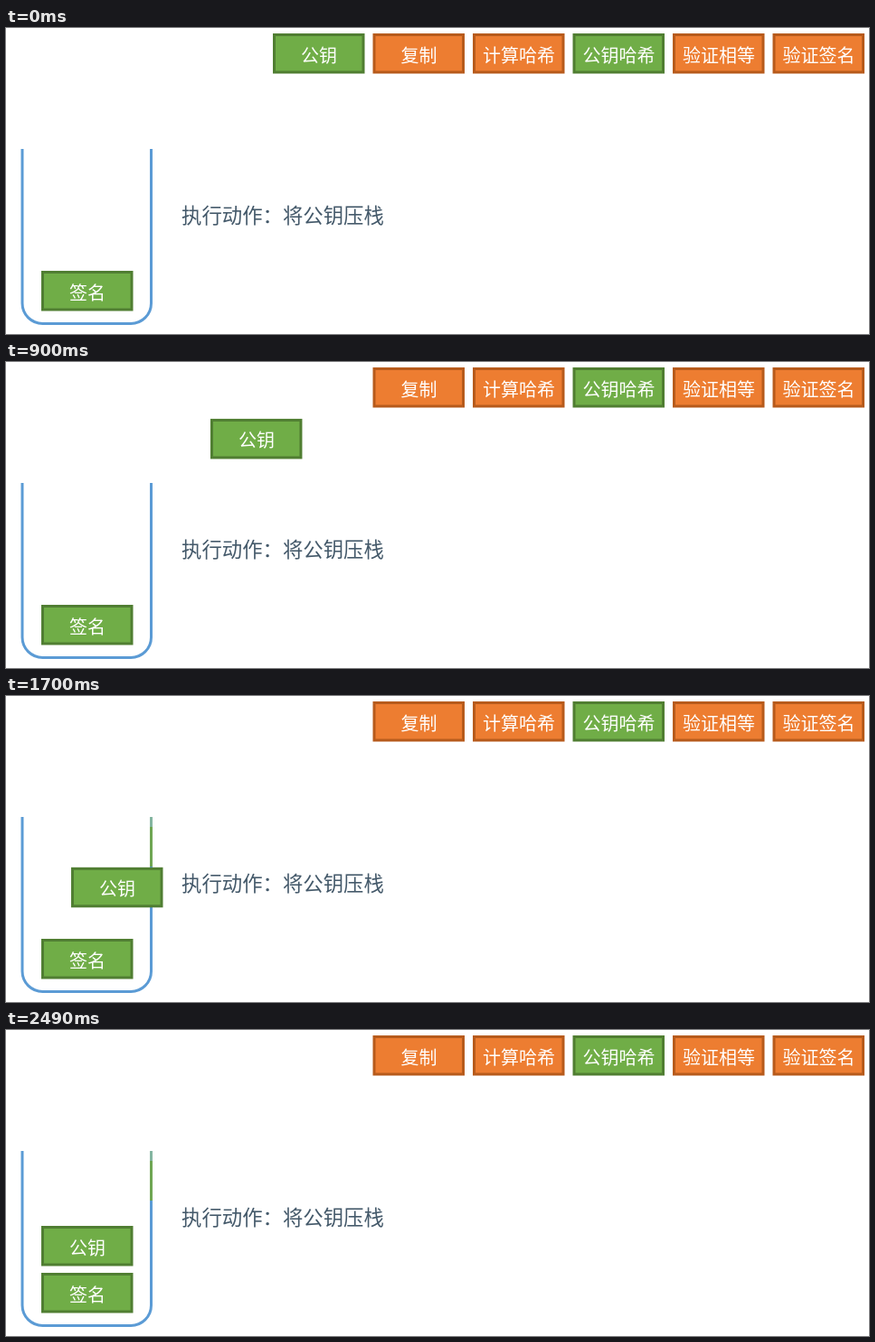
Recreate the animation shown at these times as an HTML page. Size 954x339 px, loop 5060 ms.

```html
<!DOCTYPE html>
<html lang="zh-CN">
<head>
<meta charset="utf-8">
<style>
  html, body { margin: 0; width: 100%; height: 100%; overflow: hidden; background: #fff; }
  svg { display: block; }
  text { font-family: "Noto Sans CJK SC", "Noto Sans CJK", sans-serif; font-weight: 300; dominant-baseline: central; }
  .box { stroke-width: 3; }
  .box text { font-size: 20px; fill: #fff; stroke: none; text-anchor: middle; }
  .data { fill: #70ad47; stroke: #507e32; }
  .op { fill: #ed7d31; stroke: #b75b1c; }
</style>
</head>
<body>
<svg id="stage" width="954" height="339" viewBox="0 0 954 339">
  <path d="M18 134V305a22.5 22.5 0 0 0 22.5 22.5H138a22.5 22.5 0 0 0 22.5-22.5V134" fill="none" stroke="#5b9bd5" stroke-width="3"/>
  <rect id="paleTrail" x="159" y="134" width="3" fill="#84b5a0"/>
  <rect id="greenTrail" x="159" y="145" width="3" fill="#6fa653"/>
  <text x="194" y="206" font-size="22.4" fill="#44596a">执行动作：将公钥压栈</text>
</svg>
<script>
const LOOP = 5060;
const START = { x: 295, y: 6 }, END = { x: 39, y: 217 };
const stage = document.getElementById('stage');
const paleTrail = document.getElementById('paleTrail');
const greenTrail = document.getElementById('greenTrail');

// Moments at which the moving box is redrawn
const ticks = [490, 570, 640, 720, 810, 890, 970, 1050, 1130, 1230, 1300, 1380, 1450,
  1550, 1600, 1700, 1770, 1850, 1920, 2000, 2070, 2170, 2250, 2330, 2410, 2490];

// Time and left edge along the path
const path = [[490, 292], [640, 276], [810, 246], [970, 204], [1130, 161],
  [1450, 102], [1550, 92], [1700, 72], [2070, 45], [2490, 39]];

function addBox(label, kind, x, y) {
  const g = document.createElementNS('http://www.w3.org/2000/svg', 'g');
  g.setAttribute('class', 'box ' + kind);
  g.innerHTML = `<rect x="1.5" y="1.5" width="98.5" height="41.5"/><text x="51" y="23">${label}</text>`;
  stage.append(g);
  place(g, x, y);
  return g;
}

function place(g, x, y) {
  g.setAttribute('transform', `translate(${x} ${y})`);
}

function slope(i) {
  if (i === path.length - 1) return 0;
  const a = path[Math.max(i - 1, 0)], b = path[i + 1];
  return (b[1] - a[1]) / (b[0] - a[0]);
}

// Smooth cubic through the path points
function leftAt(t) {
  if (t < path[0][0]) return START.x;
  const i = path.findLastIndex(p => p[0] <= t);
  if (i === path.length - 1) return END.x;
  const [t0, x0] = path[i], [t1, x1] = path[i + 1];
  const d = t1 - t0, u = (t - t0) / d, v = 1 - u;
  return v * v * (1 + 2 * u) * x0 + u * u * (3 - 2 * u) * x1
    + d * u * v * (v * slope(i) - u * slope(i + 1));
}

['复制', '计算哈希', '公钥哈希', '验证相等', '验证签名'].forEach((label, i) =>
  addBox(label, i === 2 ? 'data' : 'op', START.x + 110.5 * (i + 1), START.y));
addBox('签名', 'data', END.x, 269);
const mover = addBox('公钥', 'data', START.x, START.y);

function draw() {
  const now = performance.now() % LOOP;
  const x = leftAt(ticks.findLast(t => t <= now) ?? 0);
  const y = START.y + (START.x - x) / (START.x - END.x) * (END.y - START.y);
  place(mover, x, y);
  const trailEnd = Math.min(y + 1, 189);
  paleTrail.setAttribute('height', Math.max(0, Math.min(trailEnd, 145) - 134));
  greenTrail.setAttribute('height', Math.max(0, trailEnd - 145));
  requestAnimationFrame(draw);
}
draw();
</script>
</body>
</html>
```
